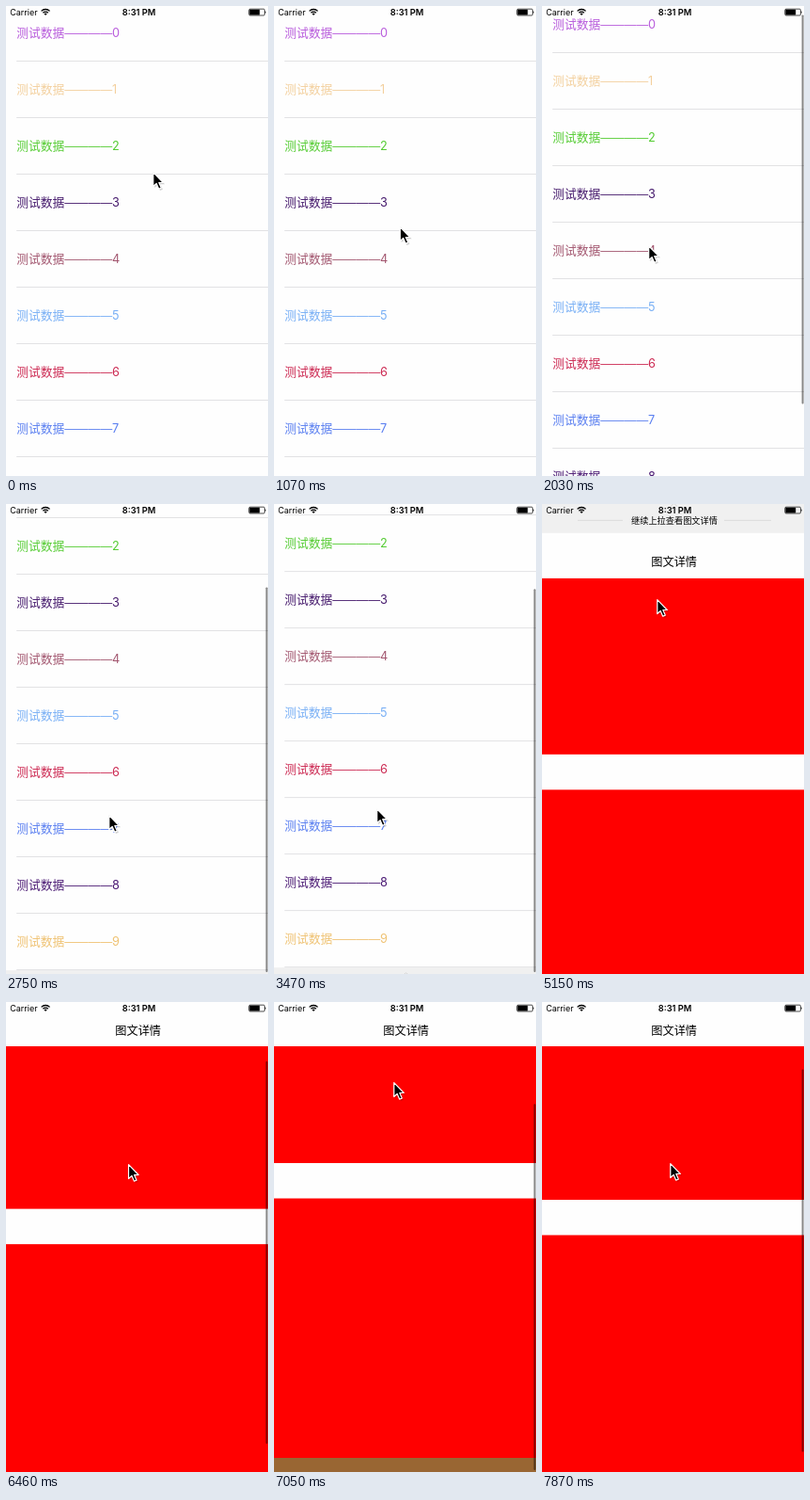
These frames come from a looping animation (279x499 px, 7990 ms). An HTML page:

```html
<!DOCTYPE html>
<html lang="zh">
<head>
<meta charset="utf-8">
<style>
  html, body { margin: 0; width: 100%; height: 100%; overflow: hidden; background: #fefefe; }
  svg { display: block; width: 100%; height: 100%; }
  text { font-family: 'Noto Sans CJK SC', 'Noto Sans CJK', sans-serif; white-space: pre; }
  .latin { font-family: Inter, 'Liberation Sans', sans-serif; }
  .dash { font-family: 'Liberation Sans', sans-serif; }
  .row { font-size: 12.75px; }
  .bar { fill: #000; fill-opacity: .47; }
</style>
</head>
<body>
<svg viewBox="0 0 279 499">
  <defs>
    <clipPath id="webClip"><rect y="684" width="279" height="452"/></clipPath>
  </defs>
  <rect width="279" height="499" fill="#fefefe"/>
  <g id="page">
    <g id="rows"></g>
    <g id="footer">
      <rect y="599" width="279" height="37" fill="#f0f0f0"/>
      <path d="M137 607.5l3.5-3 3.5 3M137 611.5l3.5-3 3.5 3" fill="none" stroke="#d6d6d6"/>
      <path d="M38 622.5h48M194 622.5h50" stroke="#dcdcdc"/>
      <text x="141" y="626.3" font-size="9.2" text-anchor="middle">继续上拉查看图文详情</text>
    </g>
    <text x="140.7" y="671.5" font-size="12.2" text-anchor="middle">图文详情</text>
    <g clip-path="url(#webClip)">
      <rect y="684" width="279" height="452" fill="#996633"/>
      <g id="web">
        <rect y="684" width="279" height="500" fill="#f00"/>
        <rect y="871" width="279" height="37.5" fill="#fefefe"/>
      </g>
    </g>
  </g>
  <rect id="listBar" class="bar" x="276.6" width="2" rx=".9"/>
  <rect id="webBar" class="bar" x="276.6" width="2" rx=".9"/>
  <g id="status">
    <text class="latin" x="4.2" y="9.6" font-size="9">Carrier</text>
    <path d="M37.6 5.4a6.3 6.3 0 0 1 9 0M39.4 7.2a3.8 3.8 0 0 1 5.4 0" fill="none" stroke="#000" stroke-width="1.3"/>
    <path d="M42.1 10l-1.6-1.7a2.3 2.3 0 0 1 3.2 0z"/>
    <text class="latin" x="141.6" y="9.6" font-size="9.3" font-weight="600" text-anchor="middle">8:31 PM</text>
    <rect x="258.7" y="3.2" width="16.8" height="6.8" rx="1.3" fill="none" stroke="#000" stroke-width=".7"/>
    <rect x="259.3" y="3.8" width="10.9" height="5.6" rx=".6"/>
    <path d="M276.2 5.2q1.4 1.4 0 2.8z"/>
  </g>
  <g id="cursor">
    <path d="M2 2.6V16l3-2.6 2.3 5.2 2.6-1.1-2.2-5H12z" fill="#000" opacity=".18"/>
    <path d="M.7 1V14.6L3.8 11.8 6.1 17 8.4 16 6.2 10.9H10.3Z" stroke="#fff" stroke-width="1.1" stroke-linejoin="round"/>
  </g>
</svg>
<script>
const $ = id => document.getElementById(id);
const colors = ['#b85cdc', '#f3d09e', '#55cc33', '#45196c', '#a2566f',
                '#78aff5', '#cc2952', '#5a7ff0', '#4b1a74', '#efc272'];
$('rows').innerHTML = colors.map((color, i) => {
  const y = 60 * i + 32.6;
  return `<g class="row" fill="${color}"><text x="11.2" y="${y}">测试数据</text>` +
    `<text class="dash" x="62.2" y="${y}">————</text>` +
    `<text class="latin" x="113" y="${y}">${i}</text></g>` +
    `<rect x="11.2" y="${60 * i + 58}" width="268" height="1" fill="#e2e2e4"/>`;
}).join('');

// The screen refreshes 67 times per loop; all motion is timed in these ticks.
const LOOP = 7990, TICKS = 67;

const linear = p => p;
const smooth = p => p * p * (3 - 2 * p);
const flick = p => Math.sin(p * Math.PI / 2);

// Part of a distance covered at a tick, for a move from tick a to tick b.
const glide = (tick, a, b, distance, ease = smooth) =>
  distance * ease(Math.min(1, Math.max(0, (tick - a) / (b - a))));

const listScroll = t =>
  glide(t, 16, 17, 9) + glide(t, 17, 23, 95, flick) + glide(t, 23, 27, -4.5) +
  glide(t, 28, 34, 99.5) + glide(t, 40, 43.97, 438, flick);

const webScroll = t => glide(t, 53, 60, 64.6, flick) + glide(t, 60, 66, -40.6);

function cursorAt(t) {
  let x = 156, y = 175.5;
  const stroke = (a, b, dx, dy, ease) => {
    x += glide(t, a, b, dx, ease);
    y += glide(t, a, b, dy, ease);
  };
  stroke(7, 11, -45, 116);
  stroke(16, 20, 5, -99, flick);
  stroke(20, 23, -7, 137);
  stroke(28, 34, -1, -92);
  stroke(40, 43, 14, -137, flick);
  stroke(43, 44, -2, -6);
  stroke(46, 52, 10, 84);
  stroke(53, 59, -3, -94);
  stroke(60, 66, 9, 86, linear);
  return [x, y];
}

function place(id, x, y, scale = 1) {
  $(id).setAttribute('transform', `translate(${x} ${y}) scale(${scale})`);
}

function setBar(id, top, length, visible) {
  const bar = $(id);
  bar.setAttribute('y', top);
  bar.setAttribute('height', Math.min(length, 497 - top));
  bar.setAttribute('opacity', visible ? 1 : 0);
}

function draw(tick) {
  const scroll = listScroll(tick), web = webScroll(tick);
  place('page', 0, -scroll);
  place('web', 0, -web);
  place('cursor', ...cursorAt(tick), 1.1);

  // Past the end of the content a scroll bar shrinks instead of moving on.
  const over = Math.max(0, scroll - 99.5);
  const listTop = 2 + .828 * (scroll - over) + 13 * (1 - Math.exp(-over / 12));
  const dragging = (tick > 16 && tick < 27) || (tick > 28 && tick < 43);
  setBar('listBar', listTop, 413, dragging);

  const webOver = Math.max(0, web - 48);
  setBar('webBar', 50 + .9 * (web - webOver) + webOver, 406, tick > 53);
}

let shown = -1;
function play() {
  const phase = performance.now() % LOOP / LOOP;
  const tick = Math.floor(phase * TICKS + .05) % TICKS;
  if (tick !== shown) draw(shown = tick);
  requestAnimationFrame(play);
}
play();
</script>
</body>
</html>
```
